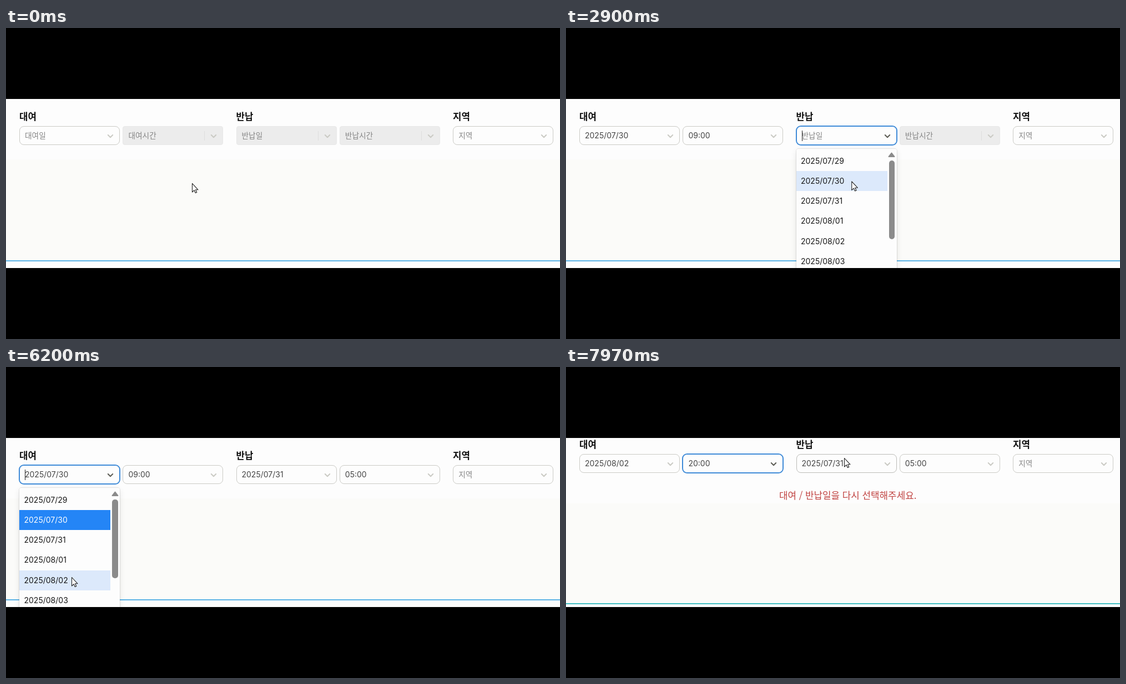
An HTML page for the animation above (8000 ms loop, 998x561 px).

```html
<!DOCTYPE html>
<html lang="ko">
<head>
<meta charset="utf-8">
<title>대여 / 반납</title>
<style>
html, body { margin: 0; width: 100%; height: 100%; overflow: hidden; background: #000; }
#page { position: absolute; left: 0; top: 128px; width: 998px; height: 305px; overflow: hidden;
  background: #fdfdfd; font-family: "Noto Sans CJK KR", "Noto Sans CJK JP", "Noto Sans CJK", sans-serif; }
/* children use stage coordinates */
#stage { position: absolute; left: 0; top: -128px; width: 998px; height: 561px; }
#stage div, #stage svg { position: absolute; box-sizing: border-box; }
#tone { left: 0; width: 998px; background: #fbfbf9; }
#line { left: 0; width: 998px; height: 2px; }
#error { left: 384px; top: 219px; font-size: 16.86px; font-weight: 500; line-height: 24px;
  color: #c04240; white-space: nowrap; }
#form { left: 0; top: 0; width: 998px; height: 561px; }
.label { top: 147px; font-size: 16.8px; font-weight: 700; line-height: 24px; color: #111; }
.box { --f: 0; --edge: #cbcbc6; --arrow: #cacac4; top: 176.5px; width: 181px; height: 34.5px;
  border-radius: 8px; background: #fdfdfd;
  border: 1px solid color-mix(in srgb, #3f8bd8 calc(var(--f) * 100%), var(--edge));
  box-shadow: 0 0 0 1px rgba(63, 139, 216, var(--f)); }
.box.over { --edge: #bcbcb8; }
.box.hot { --arrow: #999; }
.box.off { --edge: #e8e8e8; background: #ececec; border-radius: 4px; }
.text { left: 9px; top: -1px; white-space: nowrap; font: 14px/34px Inter, sans-serif; color: #444; }
.text.empty { font: 13.7px/33px "Noto Sans CJK KR", "Noto Sans CJK JP", "Noto Sans CJK", sans-serif; color: #858585; }
.caret { left: 9px; top: 7px; width: 1px; height: 19px; background: #222; }
.split { left: 146px; top: 8px; width: 1px; height: 17px; background: #dedede; }
.box svg { left: 157px; top: 11px; width: 12px; height: 12px; fill: none; stroke-width: 2;
  stroke-linecap: round; stroke-linejoin: round;
  stroke: color-mix(in srgb, #5c5c54 calc(var(--f) * 100%), var(--arrow)); }
.menu { top: 218px; width: 181px; overflow: hidden; background: #fdfdfd; border-radius: 4px; }
.shade { top: 218px; width: 181px; border-radius: 4px;
  box-shadow: 0 0 0 1px rgba(0, 0, 0, .09), 0 4px 11px rgba(0, 0, 0, .1); }
.list { left: 0; top: 0; width: 164px; }
.option { left: 0; width: 164px; height: 36.13px; padding-left: 8.5px;
  font: 14px/35.5px Inter, sans-serif; color: #161616; }
.option.over { background: #dce9fb; }
.option.down { background: #aed1f9; }
.option.chosen { background: #2485f6; color: #fff; }
.menu svg { left: 165.7px; top: 6px; width: 13px; height: 9px; fill: #8b8b8b; stroke: #8b8b8b;
  stroke-width: 2; stroke-linejoin: round; }
.thumb { left: 167px; top: 20.5px; width: 10.5px; border-radius: 5px; background: #8b8b8b; }
#cursor { left: 0; top: -1px; width: 14px; height: 20px; overflow: visible; }
</style>
</head>
<body>
<div id="page"><div id="stage">
  <div id="tone"></div>
  <div id="line"></div>
  <div id="error">대여 / 반납일을 다시 선택해주세요.</div>
  <div id="form"></div>
  <svg id="cursor" viewBox="0 0 14 20"><path d="M.5 .5V16L4.1 12.7 6.3 17.6 8.7 16.6 6.5 11.8H11Z"
    fill="#fff" stroke="#222" stroke-width="1.1" stroke-linejoin="round"/></svg>
</div></div>
<script>
const LOOP = 8000, ROW = 36.13, SHIFT_AT = 6370, WIDTH = 181;
const $ = id => document.getElementById(id);
const clamp = (v, lo = 0, hi = 1) => Math.min(hi, Math.max(lo, v));
const smooth = u => u * u * (3 - 2 * u);
const pad = n => String(n).padStart(2, '0');

function add(parent, cls, text = '') {
  const el = document.createElement('div');
  el.className = cls;
  el.textContent = text;
  parent.append(el);
  return el;
}

const hours = Array.from({ length: 24 }, (_, h) => pad(h) + ':00');
const dates = Array.from({ length: 10 }, (_, n) => {
  const d = new Date(2025, 6, 29 + n);
  return `${d.getFullYear()}/${pad(d.getMonth() + 1)}/${pad(d.getDate())}`;
});
const optionsOf = i => i % 2 ? hours : dates;

// Each session opens the menu of one box, may scroll it, and picks an option.
const sessions = [
  { i: 0, open: 430, pick: 800, opt: 1 },
  { i: 1, open: 1100, pick: 2030, opt: 9, scroll: 226, from: 1400, to: 1800 },
  { i: 2, open: 2600, pick: 3250, opt: 2 },
  { i: 3, open: 3450, pick: 4600, opt: 5 },
  { i: 0, open: 5190, pick: 6370, opt: 4, chosen: 1 },
  { i: 1, open: 6600, pick: 7550, opt: 20, scroll: 608, from: 6950, to: 7350 }
];

// time, x, y of the pointer tip
const path = [
  [0, 335, 281], [400, 110, 197], [540, 110, 197], [740, 102, 274], [840, 102, 274],
  [1070, 309, 200], [1160, 309, 200], [1400, 300, 318], [1850, 299, 327], [2060, 299, 327],
  [2520, 520, 197], [2680, 520, 197], [3020, 512, 309], [3270, 512, 309], [3430, 640, 198],
  [3560, 640, 198], [3900, 518, 201], [4000, 518, 201], [4430, 645, 413], [4620, 645, 413],
  [5030, 178, 194], [5530, 178, 194], [6050, 118, 380], [6380, 118, 380], [6590, 312, 178],
  [6630, 312, 180], [6760, 315, 246], [6800, 315, 246], [6980, 304, 326], [7570, 303, 328],
  [7930, 501, 165], [8000, 501, 165]
];

function pointer(t) {
  const n = path.findIndex(p => p[0] > t);
  const [a, b] = [path[n - 1], path[n]];
  const u = smooth((t - a[0]) / (b[0] - a[0]));
  return [a[1] + (b[1] - a[1]) * u, a[2] + (b[2] - a[2]) * u];
}

const form = $('form');
[['대여', 24], ['반납', 414.5], ['지역', 805]].forEach(([name, x]) => {
  add(form, 'label', name).style.left = x + 'px';
});

const boxes = [['대여일', 24], ['대여시간', 210.4], ['반납일', 414.5], ['반납시간', 600.8], ['지역', 805.2]]
  .map(([hint, x]) => {
    const el = add(form, 'box');
    el.style.left = x + 'px';
    const text = add(el, 'text'), split = add(el, 'split'), caret = add(el, 'caret');
    el.insertAdjacentHTML('beforeend', '<svg viewBox="0 0 12 12"><path d="M1.8 4 6 8.2 10.2 4"/></svg>');
    return { hint, x, el, text, split, caret };
  });

sessions.forEach(s => {
  const left = boxes[s.i].x + 'px';
  const names = optionsOf(s.i);
  s.height = s.open > SHIFT_AT ? 267 : 247;
  s.content = names.length * ROW + 8;
  s.shade = add(form, 'shade');
  s.menu = add(form, 'menu');
  for (const el of [s.shade, s.menu]) {
    el.style.left = left;
    el.style.height = s.height + 'px';
  }
  s.list = add(s.menu, 'list');
  s.rows = names.map((name, n) => {
    const row = add(s.list, 'option', name);
    row.style.top = 4 + n * ROW + 'px';
    return row;
  });
  s.menu.insertAdjacentHTML('beforeend', '<svg viewBox="0 0 13 9"><path d="M6.5 1.5 11.5 8H1.5Z"/></svg>');
  s.thumb = add(s.menu, 'thumb');
  s.track = s.height - 34;
  s.thumbSize = s.track * s.height / s.content;
  s.thumb.style.height = s.thumbSize + 'px';
});

function drawMenu(s, t, cx, cy) {
  const shown = t >= s.open && t < s.pick;
  s.menu.style.display = s.shade.style.display = shown ? 'block' : 'none';
  if (!shown) return;
  const scroll = s.scroll ? s.scroll * smooth(clamp((t - s.from) / (s.to - s.from))) : 0;
  s.list.style.transform = `translateY(${-scroll}px)`;
  const travel = (s.track - s.thumbSize) * scroll / (s.content - s.height);
  s.thumb.style.transform = `translateY(${travel}px)`;

  const x = cx - boxes[s.i].x, y = cy - 222;
  const inside = t > s.open + 200 && x >= 0 && x < 164 && y >= 0;
  const over = inside ? clamp(Math.floor((y + scroll) / ROW), 0, s.rows.length - 1) : 0;
  s.rows.forEach((row, n) => {
    const state = n === s.chosen ? ' chosen'
      : n !== over || (!inside && s.chosen) ? ''
      : t >= s.pick - 130 ? ' down' : ' over';
    row.className = 'option' + state;
  });
}

function drawBox(box, i, t, cx, cy) {
  const last = sessions.findLastIndex(s => s.open <= t);
  const now = sessions[last], before = sessions[last - 1];
  const ramp = now ? clamp((t - now.open) / 100) : 0;
  const focus = now?.i === i ? ramp : before?.i === i ? 1 - ramp : 0;
  const picked = sessions.findLast(s => s.i === i && s.pick <= t);
  const off = i > 0 && i < 4 && !sessions.some(s => s.i === i - 1 && s.pick <= t);
  const over = !off && cx >= box.x && cx < box.x + WIDTH && cy >= 177 && cy < 211;
  const hot = over && cx > box.x + 146;
  box.el.className = 'box' + (off ? ' off' : '') + (over ? ' over' : '') + (hot ? ' hot' : '');
  box.el.style.setProperty('--f', focus);
  box.text.className = picked ? 'text' : 'text empty';
  box.text.textContent = picked ? optionsOf(i)[picked.opt] : box.hint;
  box.split.style.display = off ? 'block' : 'none';
  box.caret.style.display = now?.i === i && t < now.pick ? 'block' : 'none';
}

function draw(t) {
  const moved = t >= SHIFT_AT;
  const [cx, cy] = pointer(t);
  const formY = moved ? cy + 20 : cy;
  form.style.top = moved ? '-20px' : '0';
  $('error').style.display = moved ? 'block' : 'none';
  $('tone').style.top = moved ? '246px' : '237px';
  $('tone').style.height = moved ? '180px' : '182px';
  $('line').style.top = moved ? '426px' : '418.5px';
  $('line').style.background = moved ? '#43bfc3' : '#5cb3e6';
  boxes.forEach((box, i) => drawBox(box, i, t, cx, formY));
  sessions.forEach(s => drawMenu(s, t, cx, formY));
  $('cursor').style.transform = `translate(${cx}px, ${cy}px)`;
}

const start = performance.now();
function tick() {
  draw((performance.now() - start) % LOOP);
  requestAnimationFrame(tick);
}
tick();
</script>
</body>
</html>
```
